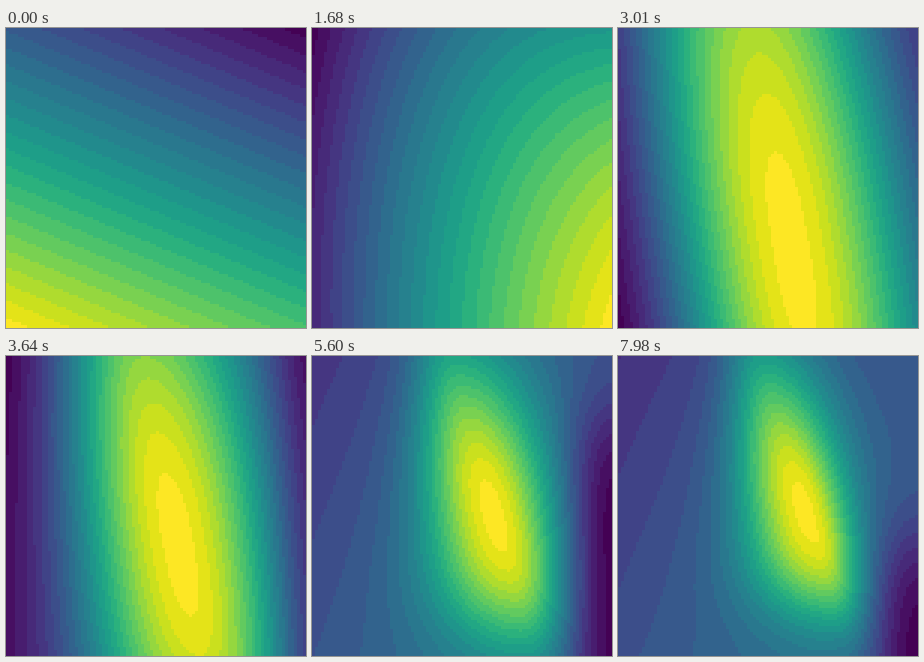
Recreate the animation shown at these times as a matplotlib script. Size 300x300 px, loop 8 s.

```python
import numpy as np
import matplotlib.pyplot as plt
from matplotlib.animation import FuncAnimation

SIZE, CELLS, LEVELS = 300, 100, 25
LOOP, TICK, HOLD = 8000, 20, 70
HILL_AT, RIDGE_AT, PEAK_AT = 1680, 3010, 4340

axis = (np.arange(CELLS) + .5) / CELLS
U, V = np.meshgrid(axis, axis)
X, Y = U * SIZE, V * SIZE


def unit(z):
    return (z - z.min()) / (z.max() - z.min())


def progress(ms, start, end):
    return min(max((ms - start) / (end - start), 0), 1)


def ramp():
    return unit(V - .42 * U)


def hill():
    return unit(U * (1.03 - .5 * U) + V * (.25 - .14 * V)
                + U * (.12 + .24 * U) * V * (1.5 - .5 * V))


def peak(ms):
    """Broad ridge that tightens into a slanted peak on a plateau."""
    tighten = progress(ms, RIDGE_AT, PEAK_AT)
    settle = 1 - (1 - progress(ms, PEAK_AT, LOOP)) ** 2

    def key(*values):
        return np.interp(tighten + settle, [0, 1, 2], values)

    dy = Y - key(190, 155, 153)
    dx = X - key(167, 172, 187) - key(.16, .22, .29) * dy
    # The left flank widens downwards, the right flank upwards
    flare = key(0, .3, .4) * dy / 150
    width = np.where(dx < 0, key(95, 52, 45) * (1 + flare),
                     key(95, 56, 33) * (1 - flare))
    up = np.maximum(-dy, 0) / key(400, 132, 115)
    down = np.maximum(dy, 0) / key(350, 130, 88)
    bump = np.exp(-((dx / width) ** 2 + up ** 2 + down ** 3) / 2)

    plateau = key(-.02, .3, .3) + .1 * tighten * V - .12 * (1 - U) ** 2
    # Dark right edge that sinks into the lower corner
    low = 1 / (1 + np.exp((key(-100, -100, 190) - Y) / 30))
    plateau -= .36 * tighten * low * np.exp(-((SIZE - X) / 50) ** 2)
    return unit(plateau + (1 - plateau) * bump)


def surface(ms):
    if ms < HILL_AT:
        a, b, mix = ramp(), hill(), progress(ms, 0, HILL_AT)
    else:
        a, b, mix = hill(), peak(ms), progress(ms, HILL_AT, RIDGE_AT)
    return np.round(unit(a + (b - a) * mix) * LEVELS) / LEVELS


fig = plt.figure(figsize=(3, 3), dpi=100)
ax = fig.add_axes([0, 0, 1, 1])
ax.axis("off")
image = ax.imshow(surface(0), cmap="viridis", vmin=0, vmax=1,
                  interpolation="nearest", aspect="auto")


def draw(i):
    image.set_data(surface(i * TICK // HOLD * HOLD))
    return [image]


anim = FuncAnimation(fig, draw, frames=LOOP // TICK, interval=TICK,
                     repeat=True, repeat_delay=0)
plt.show()
```
